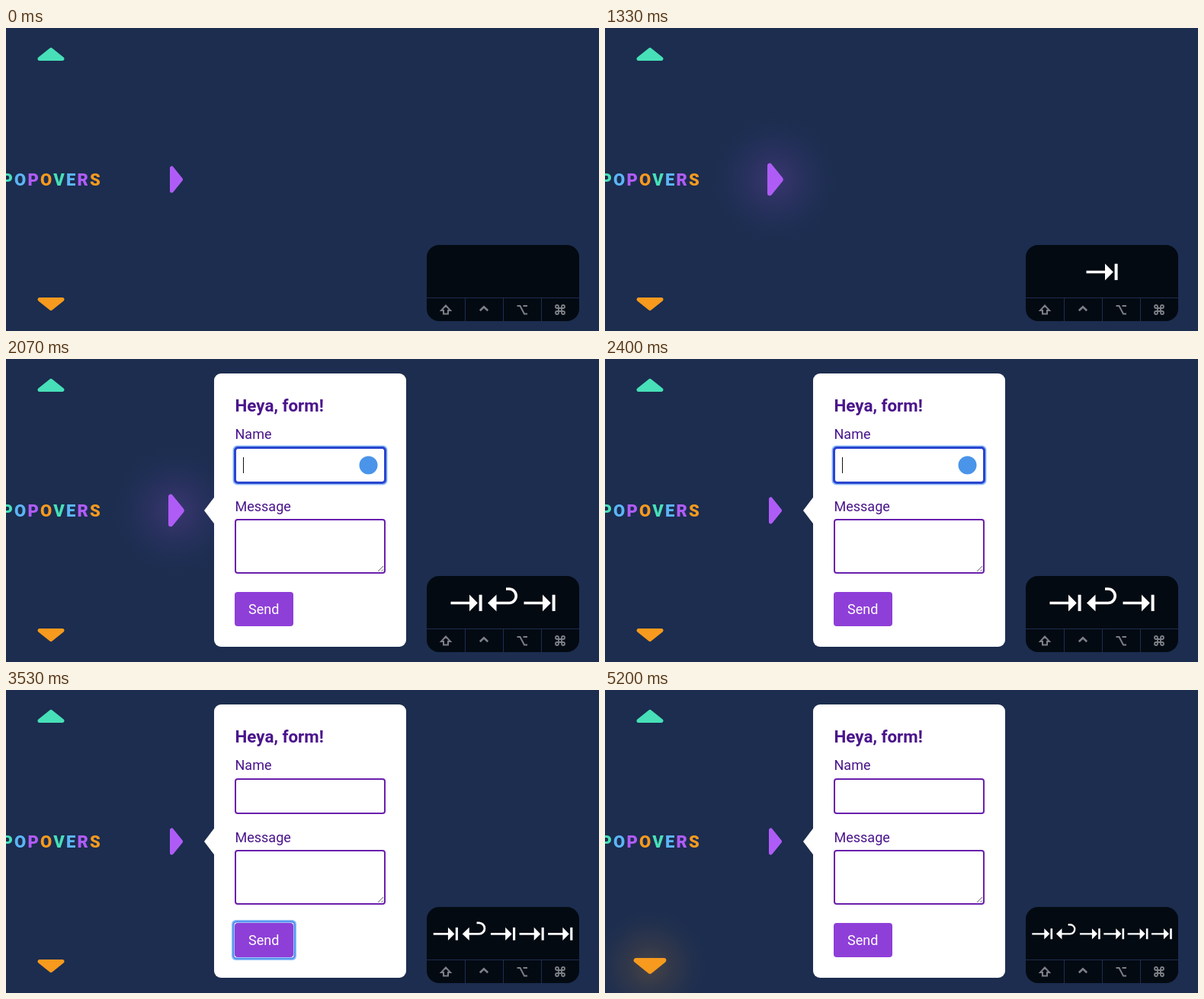
These frames come from a looping animation (778x398 px, 5.34 s). An HTML page:

```html
<!DOCTYPE html>
<html lang="en">
<head>
<meta charset="utf-8">
<title>Popover keyboard navigation</title>
<style>
  html, body { margin: 0; width: 100%; height: 100%; overflow: hidden; background: #1c2d4f; }
  svg { display: block; width: 100%; height: 100%; }
  text { font-family: Roboto, sans-serif; font-size: 18px; }
  .logo { font-size: 22px; font-weight: 800; letter-spacing: 2.2px; text-anchor: end; }
  .teal { fill: #47e0b8; stroke: #47e0b8; }
  .blue { fill: #5cb5f7; }
  .purple { fill: #af5cf7; stroke: #af5cf7; }
  .orange { fill: #f79a1e; stroke: #f79a1e; }
  .logo tspan { stroke: none; }
  .arrow { stroke-width: 5; stroke-linejoin: round; }
  .ink { fill: #4a148c; }
  .title { font-size: 22.4px; font-weight: 700; }
  .field { fill: #fff; stroke: #6a1fad; stroke-width: 2; }
  .line { fill: none; stroke: #1c2d4f; }
  .mods { fill: none; stroke: #7c7f86; stroke-width: 2; }
  .halo { fill: none; stroke: #8dbcf8; stroke-width: 2; }
  .edge { fill: none; stroke: #2a45cf; stroke-width: 3; }
  .caret { stroke: #111; }
</style>
</head>
<body>
<svg viewBox="0 0 778 398" preserveAspectRatio="none">
  <defs>
    <radialGradient id="purpleGlow">
      <stop offset="0" stop-color="#af5cf7" stop-opacity=".2"/>
      <stop offset=".4" stop-color="#af5cf7" stop-opacity=".09"/>
      <stop offset=".75" stop-color="#8a5cf7" stop-opacity=".025"/>
      <stop offset="1" stop-color="#8a5cf7" stop-opacity="0"/>
    </radialGradient>
    <radialGradient id="orangeGlow">
      <stop offset="0" stop-color="#f79a1e" stop-opacity=".2"/>
      <stop offset=".4" stop-color="#f79a1e" stop-opacity=".09"/>
      <stop offset=".75" stop-color="#f79a1e" stop-opacity=".025"/>
      <stop offset="1" stop-color="#f79a1e" stop-opacity="0"/>
    </radialGradient>
    <g id="tab" fill="#fff">
      <path d="M-20.5 -1.3H4V-10.5L14.8 .5L4 11.5V2.3H-20.5Z"/>
      <path d="M16.6 -10.3h4v21.4h-4z"/>
    </g>
    <g id="enter">
      <path d="M-12 .5H8a9.25 9.25 0 0 0 0 -18.5H4" fill="none" stroke="#fff" stroke-width="3.6"/>
      <path d="M-20 .5L-8.5 -10.5V11.5Z" fill="#fff"/>
    </g>
  </defs>

  <rect width="778" height="398" fill="#1c2d4f"/>
  <circle id="rightGlow" cx="222" cy="199" r="86" fill="url(#purpleGlow)"/>
  <circle id="downGlow" cx="59" cy="363" r="76" fill="url(#orangeGlow)"/>

  <text class="logo" x="126" y="207"><tspan class="teal">P</tspan><tspan class="blue">O</tspan><tspan class="purple">P</tspan><tspan class="orange">O</tspan><tspan class="teal">V</tspan><tspan class="blue">E</tspan><tspan class="purple">R</tspan><tspan class="orange">S</tspan></text>

  <path class="arrow teal" d="M59 28.4L74 40.5H44Z"/>
  <path class="arrow purple" id="right" d="M217.5 184V214L229.6 199Z"/>
  <path class="arrow orange" id="down" d="M44 356.5H74L59 368.6Z"/>

  <g id="form">
    <path d="M274 180.500L260 199L274 217.500Z" fill="#fff"/>
    <rect x="273" y="19" width="252" height="359" rx="9" fill="#fff"/>
    <text class="ink title" x="300.500" y="69">Heya, form!</text>
    <text class="ink" x="300.500" y="105">Name</text>
    <rect class="field" x="301" y="117" width="196" height="45" rx="3"/>
    <text class="ink" x="300.500" y="200">Message</text>
    <rect class="field" x="301" y="211" width="196" height="70" rx="3"/>
    <path d="M488 279L495 272M492.500 279L495 276.500" stroke="#666"/>
    <rect x="300" y="306" width="77" height="45" rx="4" fill="#8e3fd8"/>
    <text x="318" y="335" fill="#fff">Send</text>

    <g id="name">
      <rect class="halo" x="298.500" y="114.500" width="201" height="50" rx="5"/>
      <rect class="edge" x="300.500" y="116.500" width="197" height="46" rx="3.500"/>
      <circle cx="475.500" cy="139.500" r="12" fill="#4a94ea"/>
      <path class="caret" id="nameCaret" d="M311.500 129V150"/>
    </g>
    <g id="message">
      <rect class="halo" x="298.500" y="208.500" width="201" height="75" rx="5"/>
      <rect class="edge" x="300.500" y="210.500" width="197" height="71" rx="3.500"/>
      <path class="caret" id="messageCaret" d="M311.500 221V242"/>
    </g>
    <g id="send" fill="none">
      <rect x="297.500" y="303.500" width="82" height="50" rx="4" stroke="#8dbcf8" stroke-width="3"/>
      <rect x="298.500" y="304.500" width="80" height="48" rx="3.500" stroke="#4a8cee" stroke-width="2"/>
    </g>
  </g>

  <rect x="552" y="285" width="200" height="100" rx="16" fill="#040a12"/>
  <path class="line" d="M552 354.500H752M602.500 355V385M652.500 355V385M702.500 355V385"/>
  <g class="mods">
    <path d="M577 364.500L583 371H580V375.500H574V371H571Z"/>
    <path d="M621.800 371.300L627 366.200L632.200 371.300" stroke-width="2.600"/>
    <path d="M670.500 365H674.500L680 375.500H684M678.500 365H684"/>
    <path d="M725 366a2 2 0 1 0 -2 2H731a2 2 0 1 0 -2 -2V374a2 2 0 1 0 2 -2H723a2 2 0 1 0 2 2Z" stroke-width="1.800"/>
  </g>
  <g id="keys"></g>
</svg>

<script>
  const LOOP = 5340, BLINK = 530;
  const presses = [
    { at: 470, key: 'tab', focus: 'right' },
    { at: 1470, key: 'enter', focus: 'right' },
    { at: 2070, key: 'tab', focus: 'name' },
    { at: 2670, key: 'tab', focus: 'message' },
    { at: 3330, key: 'tab', focus: 'send' },
    { at: 4070, key: 'tab', focus: 'down' }
  ];
  const $ = id => document.getElementById(id);
  const show = (id, on) => $(id).setAttribute('visibility', on ? 'inherit' : 'hidden');

  const keys = presses.map(({ key }) => {
    const use = document.createElementNS($('keys').namespaceURI, 'use');
    use.setAttribute('href', '#' + key);
    return $('keys').appendChild(use);
  });

  // Smooth step from 0 to 1
  function ease(t, start, length) {
    const p = Math.min(1, Math.max(0, (t - start) / length));
    return p * p * (3 - 2 * p);
  }

  function setArrow(id, x, y, amount) {
    const s = 1 + 0.22 * amount;
    $(id).setAttribute('transform', `translate(${x} ${y}) scale(${s}) translate(${-x} ${-y})`);
    $(id + 'Glow').setAttribute('opacity', amount);
  }

  function setKeys(count) {
    const gap = Math.min(48, 188 / count);
    keys.forEach((use, i) => {
      const x = 652 + (i - (count - 1) / 2) * gap;
      use.setAttribute('visibility', i < count ? 'visible' : 'hidden');
      if (i < count) use.setAttribute('transform', `translate(${x} 320) scale(${gap / 48})`);
    });
  }

  function render(t) {
    const done = presses.filter(p => p.at <= t);
    const last = done[done.length - 1] || { at: 0 };

    setKeys(done.length);
    setArrow('right', 224, 199, ease(t, 470, 460) - ease(t, 2070, 300));
    setArrow('down', 59, 363, ease(t, 4070, 520));

    show('form', t >= 1470);
    for (const id of ['name', 'message', 'send']) show(id, last.focus === id);
    const caretOn = Math.floor((t - last.at) / BLINK) % 2 === 0;
    show('nameCaret', caretOn);
    show('messageCaret', caretOn);
  }

  const start = performance.now();
  function tick() {
    render((performance.now() - start) % LOOP);
    requestAnimationFrame(tick);
  }
  render(0);
  requestAnimationFrame(tick);
</script>
</body>
</html>
```
